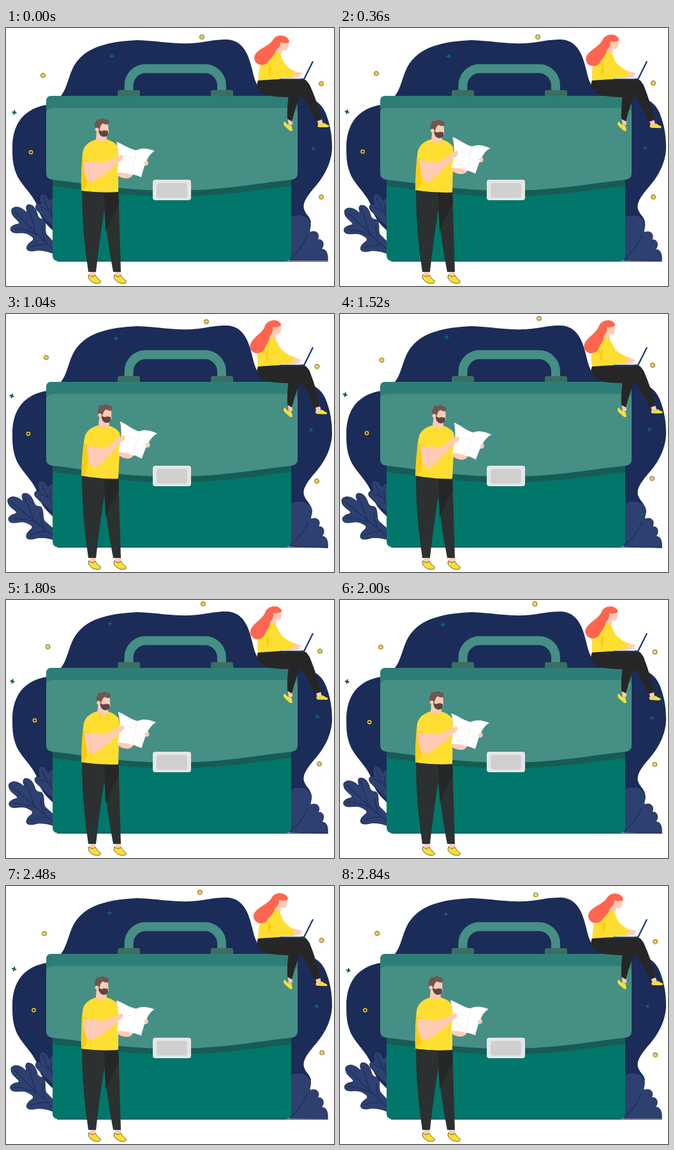
Animation of 514 by 403 pixels, one loop 2.88 s. Source, as an HTML page:

```html
<!DOCTYPE html>
<html lang="en">
<head>
<meta charset="utf-8">
<title>Briefcase</title>
<style>
  html, body { margin: 0; width: 100%; height: 100%; overflow: hidden; background: #fff; }
  svg { display: block; width: 100%; height: 100%; }
  .navy { fill: #1b2c59; }
  .leaf { fill: #2d4070; stroke: #16244d; stroke-width: .9; }
  .vein { fill: none; stroke: #1b2c59; stroke-width: 1.1; }
  .skin { fill: #ffcbb4; }
  .shirt, .shoe { fill: #ffde32; }
  .shade { fill: #ffcb0c; }
  .outlined { stroke: #2a2413; stroke-width: .7; }
  .pants { fill: #2c3030; }
  .dark { fill: #262626; }
  .hair { fill: #ff654f; }
  .flap { fill: #468f85; }
</style>
</head>
<body>
<svg viewBox="0 0 514 403">
  <path class="navy" d="M10 190C9 150 28 126 64 120L86 106C98 92 98 66 114 49C132 28 165 21 205 19C240 20 255 25 290 24C315 22 325 18 345 18C373 18 381 45 386 66C391 88 396 100 420 106H455C478 106 494 116 501 133C509 153 511 170 511 188C510 212 498 232 486 246C474 260 464 272 467 283C470 292 476 294 478 303L447 340H75L73 316C65 308 58 302 53 290C46 262 29 252 18 232C11 217 10 205 10 190Z"/>

  <g id="smallLeaf">
    <path class="leaf" d="M78 313C62 302 56 292 48 284C44 277 49 273 54 275C51 263 54 258 59 259C66 261 66 268 69 269C72 264 75 264 78 268Z"/>
    <path class="vein" d="M78 302Q65 284 58 264M67 285L53 279M71 291V276"/>
  </g>
  <g id="bigLeaf">
    <path class="leaf" d="M78 354C62 347 58 348 50 347C38 350 30 348 33 341C36 333 46 333 42 327C32 319 28 320 20 320C10 321 5 317 8 311C14 305 20 308 21 304C17 298 7 294 9 283C15 276 26 281 32 288C34 285 29 280 34 276C45 275 48 286 50 294C54 300 56 297 60 300C64 308 60 314 63 322L78 338Z"/>
    <path class="vein" d="M78 350Q45 319 14 287M50 323Q30 314 12 313M46 319Q41 297 35 281M64 338Q52 338 38 342M61 334Q57 320 57 308"/>
  </g>
  <g id="bush">
    <path class="leaf" d="M444 363V296C455 289 474 290 477 305C478 312 474 317 477 319C486 315 493 322 488 331C495 328 501 337 494 346C501 344 505 352 504 363Z"/>
    <path class="vein" d="M446 361Q464 345 472 324"/>
  </g>

  <path d="M192.500 99V90A26 26.500 0 0 1 218.500 63.500H312A26 26.500 0 0 1 338 90V99" fill="none" stroke="#468f85" stroke-width="14"/>
  <path d="M175 107V100Q175 97 178 97H207Q210 97 210 100V107ZM321 107V100Q321 97 324 97H353Q356 97 356 100V107Z" fill="#3a6f61"/>
  <path d="M73 220H447V355Q447 364 438 364H82Q73 364 73 355Z" fill="#00776a"/>
  <path d="M80 364.300H505" stroke="#1b2c59"/>
  <path d="M73 228H447V247C390 253 340 263 260 263S130 253 73 247Z" fill="#165c55"/>
  <path d="M63 220V114Q63 106 71 106H449Q457 106 457 114V220Z" fill="#2d7e77"/>
  <path class="flap" d="M63 135Q63 125 73 125H447Q457 125 457 135V227Q457 236 447 237C390 243 340 254 260 254S130 243 73 237Q63 236 63 227Z"/>
  <rect x="230" y="237" width="60" height="32" rx="4" fill="#e6e6e6"/>
  <rect x="236" y="242" width="48" height="23" rx="4" fill="#d0d0d0"/>

  <g id="dots"></g>

  <!-- Standing man -->
  <path class="skin" d="M131 379H141L140 388L133 389ZM170 379H180L180 388L173 389Z"/>
  <path id="shoe" class="shoe outlined" d="M130 385Q135 391 140 386Q142 391 148 395Q150 399 142 399Q133 398 129 390Z"/>
  <use href="#shoe" x="40"/>
  <path class="pants" d="M119 252H176Q178 315 180 381H168Q159 335 154 284Q146 335 141 381H129Q119 315 119 252Z"/>
  <path class="dark" d="M154 252H176L177 275Q166 293 156 318Z"/>
  <g id="man">
    <path class="shirt" d="M141 174Q150 179 158 174Q171 178 175 185Q179 205 176 225V256Q147 258 118 254Q117 225 120 195Q122 180 141 174Z"/>
    <path class="shade" d="M119 204L129 207Q124 235 128 241Q126 251 118 254Z"/>
    <g id="manHead">
      <path class="skin" d="M142 160H157L158 174Q150 181 141 174Z"/>
      <path class="skin" d="M142 149H160L161 164Q153 171 146 165Z"/>
      <path d="M145 158Q149 163 153 160Q158 160 160 161Q161 170 153 170Q145 169 145 158Z" fill="#5d4542"/>
      <path d="M140 157Q137 150 141 147Q140 142 147 143Q152 139 156 143Q162 142 161 150Q156 152 152 149Q148 151 147 158L143 160Z" fill="#71564f"/>
      <circle class="skin" cx="142.500" cy="158.500" r="2.800"/>
    </g>
    <g id="paper">
      <path class="skin" d="M176 222L200 225Q199 234 190 235Q180 235 175 230Z"/>
      <ellipse class="skin" cx="219" cy="211" rx="4" ry="4"/>
      <path d="M173 178C183 181 193 189 204 191C215 186 224 189 233 192C222 198 217 214 212 233C206 231 200 228 196 229C190 226 182 226 174 226C177 210 178 195 173 178Z" fill="#fff"/>
      <path d="M204 192Q202 210 197 228M185 199L199 203" fill="none" stroke="#e9e9e9" stroke-width=".8"/>
      <path class="skin" d="M215 211L221 207L220 214Z"/>
    </g>
    <path id="manArm" class="skin"/>
  </g>

  <!-- Seated woman -->
  <g id="woman">
    <path class="skin" d="M423 29H433L432 40Q425 43 419 36Z"/>
    <path class="shirt" d="M418 33Q424 39 430 39Q434 52 437 62V87H395Q395 60 404 44Q408 37 418 33Z"/>
    <path class="skin" d="M427 18H443Q444 27 440 34Q434 36 429 33Z"/>
    <path class="hair" d="M444 22C443 10 424 8 418 19C411 30 391 33 389 46C389 58 403 61 410 54C415 46 421 44 423 35Q431 29 430 22Q437 25 444 22Z"/>
  </g>
  <path id="sleeve" class="shirt"/>
  <path id="sleeveShade" class="shade"/>
  <path class="skin" d="M441 137H448L449 151L443 152Z"/>
  <path class="shoe" d="M437 146Q441 153 447 152L449 160Q446 163 441 157Q434 152 435 148Z"/>
  <path class="dark" d="M443 104H462Q454 122 448 146L441 142Q440 125 443 104Z"/>
  <g id="shin">
    <path class="skin" d="M486 140H494L497 150L490 152Z"/>
    <path class="shoe" d="M489 150Q495 153 498 148Q502 151 506 152Q508 155 502 155H490Q487 153 489 150Z"/>
    <path class="dark" d="M455 84Q470 78 476 89Q489 118 495 143L486 146Q475 120 462 106Z"/>
  </g>
  <path class="dark" d="M395 82Q430 79 467 80Q476 83 474 98Q467 109 452 108C425 108 402 108 395 94Q392 88 395 82Z"/>
  <path d="M429 80H467L481 52" fill="none" stroke="#1b3a78" stroke-width="2.300"/>
  <path d="M430 78.700H462" stroke="#fff" stroke-width="1"/>
  <path id="womanHand" class="skin" d="M451 69Q462 67 465 72L459 74Q465 74 463 76L449 77Z"/>
</svg>
<script>
const PERIOD = 2880, STEP = 40;
const KEY_TIMES = [0, 360, 1040, 1520, 1800, 2200];
const part = id => document.getElementById(id);

// Smooth periodic curve through one value per key time.
function track(values, t) {
  const n = KEY_TIMES.length;
  const time = i => KEY_TIMES[(i + n) % n] + PERIOD * Math.floor(i / n);
  const value = i => values[(i + n) % n];
  const slope = i => (value(i + 1) - value(i - 1)) / (time(i + 1) - time(i - 1));
  let i = n - 1;
  while (KEY_TIMES[i] > t) i--;
  const span = time(i + 1) - time(i), u = (t - time(i)) / span, v = 1 - u;
  return v * v * ((1 + 2 * u) * value(i) + u * span * slope(i))
       + u * u * ((3 - 2 * u) * value(i + 1) - v * span * slope(i + 1));
}

const dots = [
  { ring: true, x: [307, 310, 314, 312, 309, 303], y: [14, 14, 12, 7, 6, 7] },
  { ring: true, x: [58, 57, 63, 65.5, 65.5, 62], y: [74, 71, 68, 72, 73, 74] },
  { ring: true, x: [39, 35.5, 35, 42, 45, 46], y: [194, 193, 187, 186, 188, 193] },
  { ring: true, x: [494, 491, 487.5, 490, 492, 494.5], y: [87, 86, 82, 80, 80, 83] },
  { ring: true, x: [494, 491, 487, 489, 491, 495], y: [264, 264, 261, 257, 256, 258] },
  { color: '#12727a', angle: 0, x: [166, 170, 172, 167, 163, 160.5], y: [44, 44, 38, 36, 37, 40] },
  { color: '#0b4a5c', angle: 12, bold: true, x: [13, 11, 9, 8, 10, 12], y: [132, 131, 128, 126, 127, 128] },
  { color: '#12727a', angle: 25, x: [481.5, 478, 478, 485, 488, 489], y: [188, 187, 181, 180, 182, 187] }
];
for (const dot of dots) {
  dot.node = document.createElementNS('http://www.w3.org/2000/svg', 'g');
  dot.node.innerHTML = dot.ring
    ? '<circle r="2.700" fill="none" stroke="#2a2a35" stroke-width="2.200"/><circle r="2.600" fill="none" stroke="#f9cf1e" stroke-width="1.500"/>'
    : `<path d="M-3.500 0H3.500M0 -3.500V3.500" transform="rotate(${dot.angle})" stroke="${dot.color}" stroke-width="${dot.bold ? 2 : 1.3}"/>`;
  part('dots').append(dot.node);
}

const move = (node, x, y) => node.setAttribute('transform', `translate(${x} ${y})`);
const turn = (id, angle, x, y) => part(id).setAttribute('transform', `rotate(${angle} ${x} ${y})`);

function draw(t) {
  for (const dot of dots) move(dot.node, track(dot.x, t), track(dot.y, t));

  const sway = track([0, -1.5, -5.6, -5.6, -4, -1.7], t);
  turn('bigLeaf', sway, 75, 350);
  turn('smallLeaf', sway * .75, 75, 305);
  turn('bush', -sway * .4, 447, 363);

  turn('man', track([0, 1.5, 2.7, 2.9, 1.5, .2], t), 148, 256);
  move(part('manHead'), 0, track([0, 2, -.3, .5, 2, .4], t));
  const lift = track([0, -7.5, -10.5, -9, -3.5, 0], t);
  part('paper').setAttribute('transform', `translate(${-lift * .05} ${lift}) rotate(${-lift * .22} 203 205)`);
  const bend = -lift * .5;
  part('manArm').setAttribute('d',
    `M${121 + bend * .6} 207Q${133 + bend * .5} 210 ${145 + bend * .3} 207V211Q160 209 171 ${203 + lift}
     L182 ${198 + lift}Q187 ${205 + lift} 177 ${209 + lift}
     Q160 ${227 + lift / 2} ${136 + bend} 240Q${122 + bend * 1.2} 244 ${121 + bend * .6} 207Z`);

  const lean = track([0, .53, 1, 1, .94, .4], t);
  turn('woman', -11.5 * lean, 415, 82);
  part('sleeve').setAttribute('d',
    `M${430 - 8 * lean} 42Q${436 - 4 * lean} 62 456 69L452 78Q432 83 ${414 - 4 * lean} 78L${411 - 7 * lean} 56Z`);
  part('sleeveShade').setAttribute('d',
    `M${416 - 5 * lean} 54Q${408 - 4 * lean} 64 ${413 - 3 * lean} 76Q${416 - 4 * lean} 66 ${416 - 5 * lean} 54Z`);
  move(part('womanHand'), -2 * lean, lean);
  turn('shin', -track([0, -3, -3.5, -.7, -2, -5], t) * .8, 470, 86);
}

function frame(now) {
  draw(Math.floor(now % PERIOD / STEP) * STEP);
  requestAnimationFrame(frame);
}
draw(0);
requestAnimationFrame(frame);
</script>
</body>
</html>
```
